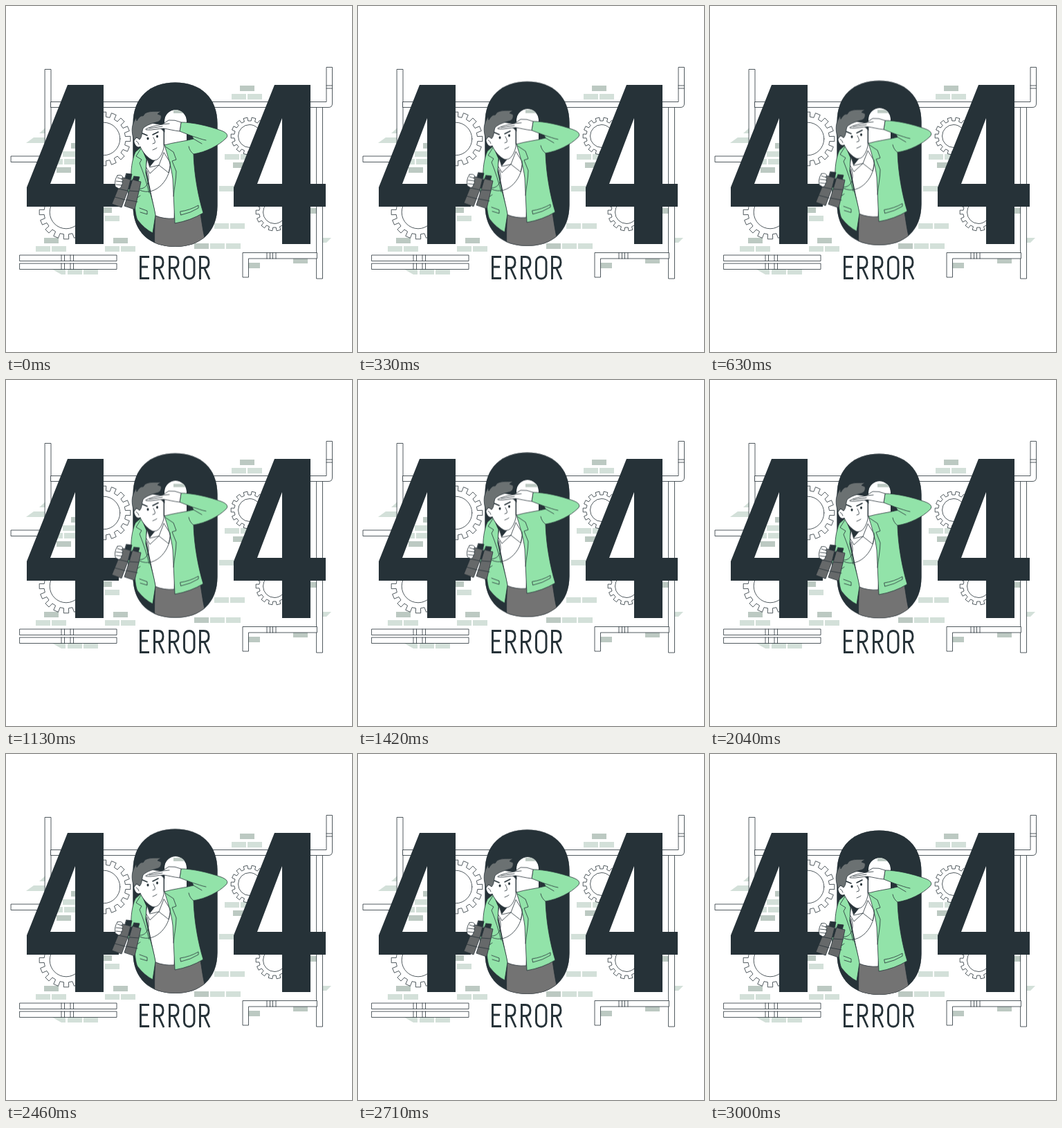
Recreate the animation shown at these times as an HTML page. Size 500 by 500 pixels, loop 3.04 s.

```html
<!DOCTYPE html>
<html lang="en">
<head>
<meta charset="utf-8">
<title>404 error</title>
<style>
  html, body { margin: 0; width: 100%; height: 100%; overflow: hidden; background: #fff; }
  svg { display: block; width: 100%; height: 100%; }
  .line { fill: none; stroke: #263238; stroke-width: .8; stroke-linejoin: round; stroke-linecap: round; }
  .white { fill: #fff; }
  .green { fill: #92e3a9; }
  .grey { fill: #737373; }
  .dark { fill: #263238; }
  .metal { fill: #66696a; }
  .letters { fill: none; stroke: #263238; stroke-width: 2.9; }
</style>
</head>
<body>
<svg viewBox="0 0 500 500" role="img" aria-label="404 error">
  <defs>
    <path id="four" fill-rule="evenodd" d="M89 114H141V257H163V290H141V344H100V290H30V262ZM100 162V257H64Z"/>
    <path id="zero" d="M183.500 170C183.500 132 208 110.500 244.500 110.500S305.500 132 305.500 170V289C305.500 327 281 348 244.500 348S183.500 327 183.500 289Z"/>
    <clipPath id="inside"><use href="#zero"/></clipPath>
    <path id="joint" d="M0 0V8.500M4.500 0V8.500"/>
  </defs>

  <g id="bricks">
    <path fill="#d3e0d9" d="M29 198L40 190H56V198ZM48 184L57 176V184ZM66 380H86V388H80ZM458 335H470L463 342H457Z"/>
  </g>
  <g id="gears" class="line"></g>

  <g class="line">
    <path class="white" d="M56.500 91.500H65V230H56.500Z"/>
    <path class="white" d="M7.500 217H56V225.500H7.500Z"/>
    <path class="white" d="M449 142H457.500V394H449Z"/>
    <path class="white" d="M65 138.500H463V88.500H471.500V141Q471.500 146.500 466 146.500H65Z"/>
    <path d="M463 115H471.500M463 119H471.500"/>
    <path class="white" d="M449 356.500H342V392H350.500V365H449Z"/>
    <path class="white" d="M20 360H160V368.500H20ZM20 372H160V380.500H20Z"/>
    <use href="#joint" x="377" y="356.500"/>
    <use href="#joint" x="385.500" y="356.500"/>
    <g id="joints">
      <use href="#joint" x="80" y="360"/>
      <use href="#joint" x="93" y="360"/>
    </g>
    <use href="#joints" y="12"/>
  </g>

  <g class="dark">
    <use href="#four"/>
    <use href="#four" x="299"/>
  </g>

  <g class="letters">
    <path d="M207 362.500H194.500V393.500H207M194.500 377H205"/>
    <g id="r"><path d="M214.500 395V362.500H220Q227 362.500 227 370.500T220 378.500H214.500M220.500 378.500L228 395"/></g>
    <use href="#r" x="22"/>
    <rect x="257.500" y="362.500" width="14.500" height="31.500" rx="7"/>
    <use href="#r" x="66"/>
  </g>

  <g id="float">
    <path class="dark" d="M183.500 170C183.500 132 208 110.500 244.500 110.500S305.500 132 305.500 170V289C305.500 327 281 348 244.500 348S183.500 327 183.500 289Z"/>
    <g clip-path="url(#hole)">
      <rect class="white" x="229" y="150" width="32" height="120" rx="16"/>
      <rect id="glimpse" x="242" y="147" width="18" height="8" fill="#bcc9c2" clip-path="inset(3px 0 0 0)"/>
    </g>

    <g clip-path="url(#inside)" class="line">
      <path class="grey" d="M216 298C215 315 214 335 215 350H291C286 334 284 320 281 300Z"/>
      <use href="#zero"/>
    </g>

    <!-- shirt and neck -->
    <g class="line">
      <path class="white" d="M204 217L229 200L241 222L246 240L243 307Q228 308 216 303L202 235Z"/>
      <path class="dark" d="M202 215L215 223L207 233L203 226Z"/>
      <path class="white" d="M204 221L202 232L208 242L221 230L208 233Z"/>
      <path class="white" d="M228 212L221 230L235 241L238 228Z"/>
    </g>

    <!-- jacket -->
    <g class="line">
      <path class="green" d="M195 204L187 211C182 222 180 238 181 252L176 266L178 280L186 279C186 290 187 303 190 309Q200 322 212 328L216 302C214 290 211 280 208 268L202 241L203 222Z"/>
      <path d="M195 206L188 217L196 222L193 227C199 242 203 255 207 270M193 292L204 296V301L194 298M187 279L194 274"/>
      <path class="green" d="M229 201C242 197 256 196 271 192L269 188L251 181L253 168C270 168 292 173 311 180C319 183 322 187 318 191C307 202 289 211 271 214C272 245 278 276 285 299Q267 310 244 314C243 294 242 270 241 250C239 232 233 214 229 201Z"/>
      <path d="M230 203L242 211L246 222L240 224L246 239C246 251 243 263 242 275M264 203C265 208 268 212 271 214M269 188C276 190 283 193 289 194M271 192L283 199M252 297Q266 295 278 288V292Q267 299 253 302Z"/>
    </g>

    <!-- head -->
    <g class="line">
      <path class="white" d="M193 192C187 187 183 193 186 199C188 204 192 205 194 203C197 211 205 220 212 223C220 224 225 217 228 205V172L203 168L193 180Z"/>
      <path fill="#6b7172" d="M185 194C182 186 181 177 184 169L188 161L189 166C192 161 195 158 198 159L201 155C208 151 217 153 224 152L219 156L224 158C225 163 223 167 217 168C210 170 203 172 198 177C196 183 197 189 193 193L189 190Z"/>
      <path d="M188 195Q191 196 192 200M213 190C215 194 216 196 215 198L212 199M212 208Q215 207 218 205"/>
      <path stroke-width="1.600" d="M197 184L204 187M212 186L220 182"/>
      <path class="dark" d="M224 177H229V182Z"/>
    </g>
    <g class="dark">
      <ellipse cx="205" cy="191.500" rx="1.500" ry="2"/>
      <ellipse cx="218.500" cy="188.500" rx="1.500" ry="2"/>
    </g>

    <!-- saluting hand -->
    <g class="line">
      <path class="white" d="M202 178C208 174 218 173 226 171L235 165Q244 164 253 168L251 181C242 180 235 178 228 177C219 177 211 180 203 179Z"/>
      <path d="M207 177L226 174M226 171L236 170"/>
    </g>

    <!-- strap, binoculars and grip -->
    <g class="line">
      <path d="M237 225C240 248 217 277 193 266M204 238C210 253 203 266 191 264"/>
      <path class="dark" d="M174 242L182 243L180 251L172 249ZM185 246L193 247L191 254L183 252Z"/>
      <path class="dark" d="M172 250L192 255L189 268L168 262Z"/>
      <path class="metal" d="M169 248L180 251L176 267L167 291L153 286L162 264Z"/>
      <path class="metal" d="M183 251L195 254L192 268L186 294L171 289L178 267Z"/>
      <path d="M162 264L176 267M178 267L192 268M157 276L172 280M174 280L190 283"/>
      <path class="white" d="M161 245Q166 243 169 247L167 250Q170 251 168 254Q169 257 167 259Q167 263 163 264L158 261Q156 252 161 245Z"/>
      <path d="M161 248L167 250M159 253L168 254M159 258L167 259"/>
    </g>
  </g>
  <clipPath id="hole"><rect x="229" y="150" width="32" height="120" rx="16"/></clipPath>
</svg>
<script>
  const NS = "http://www.w3.org/2000/svg";
  const add = (id, tag, attrs) => {
    const el = document.createElementNS(NS, tag);
    for (const key in attrs) el.setAttribute(key, attrs[key]);
    document.getElementById(id).append(el);
  };

  // A row of bricks, one letter each: d dark, l light
  const TONES = { d: "#bcc9c2", l: "#d3e0d9" };
  const course = (x, y, tones) => [...tones].forEach((tone, i) =>
    add("bricks", "rect", { x: x + i * 23, y, width: 21, height: 8, fill: TONES[tone] }));

  // One dark brick bonded with two light ones below (side 1) or above (side -1)
  const pile = (x, y, side = 1) => {
    course(x, y, "d");
    course(x - 12, y + 12 * side, "ll");
  };
  pile(338, 115);
  pile(55, 335);
  pile(155, 335);
  pile(132, 291);
  pile(94, 198);
  pile(73, 233, -1);
  pile(328, 226, -1);
  course(272, 343, "dll");
  course(301, 314, "ll");
  course(89, 380, "ll");
  course(308, 260, "l");
  course(430, 292, "d");
  course(415, 364, "d");
  course(346, 371, "d");

  function gear(cx, cy, outer, teeth) {
    const inner = outer * .82, hole = outer * .61;
    const at = (r, turn) => {
      const a = turn * 2 * Math.PI / teeth;
      return `${(cx + r * Math.cos(a)).toFixed(1)} ${(cy + r * Math.sin(a)).toFixed(1)}`;
    };
    const points = [];
    for (let i = 0; i < teeth; i++)
      points.push(at(inner, i - .28), at(outer, i - .24), at(outer, i + .24), at(inner, i + .28));
    add("gears", "path", { d: "M" + points.join("L") + "Z" });
    add("gears", "circle", { cx, cy, r: hole });
  }
  gear(141, 192, 39, 16);
  gear(87, 298, 39, 16);
  gear(352, 188, 27, 14);
  gear(388, 298, 27, 14);

  const LOOP = 3040, RISE = 1500, LIFT = 6;
  const drift = (id, lift) => document.getElementById(id).animate([
    { transform: "translateY(0)", offset: 0 },
    { transform: `translateY(${-lift}px)`, offset: RISE / LOOP },
    { transform: "translateY(0)", offset: 2 * RISE / LOOP },
    { transform: "translateY(0)", offset: 1 }
  ], { duration: LOOP, iterations: Infinity });

  drift("float", LIFT);
  drift("glimpse", -LIFT); // stays still behind the moving hole
</script>
</body>
</html>
```
